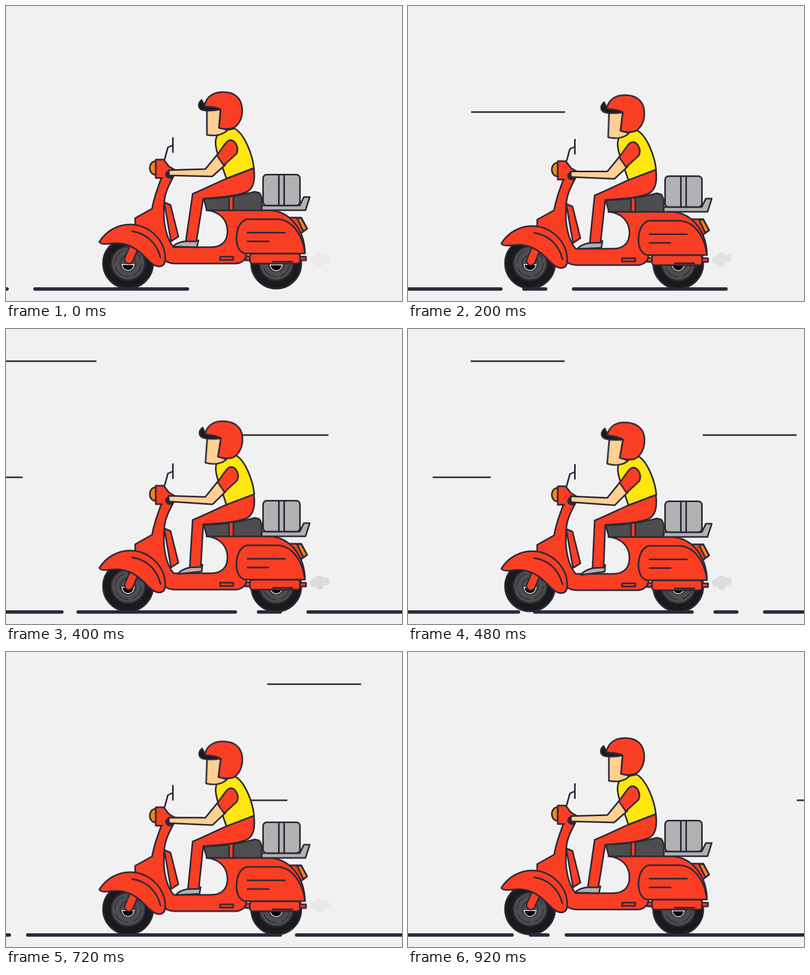
Recreate the animation shown at these times as an HTML page. Size 751x559 px, loop 0.96 s.

```html
<!DOCTYPE html>
<html lang="en">
<head>
<meta charset="utf-8">
<title>Scooter ride</title>
<style>
html, body { margin: 0; width: 100%; height: 100%; overflow: hidden; background: #f1f1f1; }
svg { display: block; width: 751px; height: 559px; }

.ink { stroke: #2d2838; stroke-width: 3; stroke-linejoin: round; stroke-linecap: round; }
.line { fill: none; }
.red { fill: #fa3e24; }
.yellow { fill: #ffe60d; }
.skin { fill: #ffd092; }
.grey { fill: #b1b1b1; }
.seat { fill: #4d4d4d; }
.orange { fill: #f7860e; }
.black { fill: #1a1a1a; }
.thin { stroke-width: 1.5; }
.fork { stroke-width: 19; }
.fork-fill { stroke: #fa3e24; stroke-width: 13.5; }

.wind, .road { animation: slide .96s steps(24) infinite; }
.wind { --run: 1506px; stroke-linecap: butt; }
.road { --run: 1243px; stroke-width: 6.5; }
@keyframes slide { to { transform: translateX(var(--run)); } }

/* down for 12 steps, up for 11, then rest */
.bob, .morph { animation: bob .96s infinite; }
.bob { transform-box: view-box; transform-origin: 412px 205px; }
.morph { animation-name: morph; }
@keyframes bob {
  0% { transform: none; animation-timing-function: steps(12); }
  50% { transform: var(--low); animation-timing-function: steps(11); }
  95.8333%, 100% { transform: none; }
}
@keyframes morph {
  0% { d: var(--up); animation-timing-function: steps(12); }
  50% { d: var(--down); animation-timing-function: steps(11); }
  95.8333%, 100% { d: var(--up); }
}

.body { --low: translate(0, 7px); }
.sleeve { --low: translate(1.5px, 8.5px); }
.head { --low: translate(0, 14px) rotate(5deg); }

.leg {
  --up: path("M470 307C473 330 470 347 455 353C435 361 400 363 374 365L361 446L341 446L354 356C380 345 400 335 418 327Z");
  --down: path("M470 314C473 337 470 354 455 360C435 368 400 370 374 371L371 452L350 453L354 363C380 352 400 342 418 334Z");
}
.shoe {
  --up: path("M317 456C322 449 335 446 346 445L365 444L362 457Z");
  --down: path("M328 466C333 458 345 454 356 452L374 447L373 460Z");
}
.torso {
  --up: path("M400 246C392 262 404 287 411 307L418 327L470 307C468 283 452 241 433 232L416 236Z");
  --down: path("M400 254C393 270 405 294 411 313L418 334L471 314C469 290 455 252 437 241L418 246Z");
}
.arm {
  --up: path("M309 311L378 309L402 280L416 301L391 323L309 321Z");
  --down: path("M308 317L378 320L403 289L417 309L392 334L309 328Z");
}

.smoke { fill: #dcdcdc; animation: puff .96s infinite; }
@keyframes puff {
  0% { opacity: .28; animation-timing-function: steps(5); }
  20.8333% { opacity: .75; animation-timing-function: steps(3); }
  33.3333% { opacity: 1; animation-timing-function: steps(4); }
  50% { opacity: .95; animation-timing-function: steps(11); }
  95.8333% { opacity: 0; animation-timing-function: steps(1); }
  100% { opacity: .28; }
}
</style>
</head>
<body>
<svg viewBox="0 0 751 559">
  <defs>
    <g id="wheel">
      <circle class="ink black" r="47.5"/>
      <circle class="ink seat" r="32"/>
      <circle class="ink line thin" r="25" stroke-dasharray="30 9"/>
      <circle class="ink seat thin" r="15"/>
      <path d="M-11 2.500A11 11 0 0 0 11 2.500Z" stroke="#fff" stroke-width="1.8" stroke-dasharray="2.4 .8"/>
    </g>
  </defs>

  <path class="ink line wind" d="M-194 201h178M-634 61h178M-706 281h110"/>
  <path class="ink line road" d="M-39 536.200H2M55 536.200H344M-381 536.200H-83M-891 536.200H-412M-959 536.200H-926M-1300 536.200H-994"/>

  <g class="smoke">
    <circle cx="584" cy="481" r="8"/>
    <circle cx="594" cy="476" r="8.5"/>
    <circle cx="606" cy="478" r="8"/>
    <circle cx="595" cy="486" r="8"/>
  </g>

  <use href="#wheel" x="231.5" y="487.5"/>
  <use href="#wheel" x="512.5" y="488"/>

  <g class="bob body ink">
    <!-- fork and fittings -->
    <path class="line fork" d="M245 452L233 480"/>
    <path class="line fork-fill" d="M245 452L233 480"/>
    <path class="red" d="M454 474h10v8h-10zM556 475h13v7h-13z"/>
    <path class="red" d="M537 401H560L571 422L559 431Z"/>
    <path class="orange" d="M552 402H560L571 422L564 427Z"/>

    <!-- frame -->
    <path class="red" d="M300 372L312 377L327 437L313 446Z"/>
    <path class="red" d="M245 416V402L277 384C281 362 287 347 296 322L323 312C315 330 300 350 300 376C297 410 304 441 318 457H388C410 457 420 445 420 427C420 405 405 389 380 387H500C540 389 566 425 567 468L456 469C456 480 447 488 435 488H320C309 488 302 484 296 478Z"/>
    <path class="red" d="M177 447C190 426 212 414 235 414C269 414 302 441 302 479C302 489 298 493.500 290 493.500C280 493 272 484 262 474C244 456 225 447 200 450C186 452 178 451 177 447Z"/>
    <path class="line" d="M239 427C262 430 285 445 293 477"/>
    <rect class="red" x="462.5" y="469" width="95" height="19" rx="5"/>
    <path class="red" d="M456 404H514C536 404 561 424 567 469H453C441 466 437 452 437 439C438 420 445 408 456 404Z"/>
    <path class="line" d="M458 429.500H529M458 446H498M506 484.500H543"/>
    <rect class="red" x="406" y="475" width="25" height="6"/>

    <!-- seat and cargo -->
    <path class="seat" d="M375 365C420 365 450 357 472 352L480 354C486 360 486 374 484 387H381Z"/>
    <path class="red" d="M423 361L431 360V387H423Z"/>
    <path class="grey" d="M485 378H557L565 362H576L568 387H485Z"/>
    <rect class="grey" x="487.5" y="319.5" width="70" height="58.5" rx="7"/>
    <path class="line" d="M517.500 320V378M527.500 320V378"/>

    <!-- handlebar -->
    <path class="line" d="M301 290L307 268L316 264M316.500 250V277"/>
    <path class="orange" d="M284 294C269 294 269 320 284 320Z"/>
    <path class="red" d="M284 291H299L309 304L323 312L314 326H284Z"/>
    <path class="red" d="M298 323L318 314L311 328L297 331Z" stroke="none"/>
    <circle cx="310" cy="319" r="6.5" fill="#2d2838"/>
  </g>

  <path class="ink grey morph shoe"/>
  <path class="ink red morph leg"/>
  <path class="ink yellow morph torso"/>
  <path class="ink skin morph arm"/>
  <path class="ink red bob sleeve" d="M400 283L413 302L437 280C443 268 434 253 424 254.500C419 255 416 261 412 266Z"/>

  <g class="bob head ink">
    <path class="skin" d="M381 194V244C395 247 411 245 420 235L404 230L407 194Z"/>
    <path class="red" d="M376 190C380 170 395 163 412 163C437 163 448 178 448 198C448 215 440 227 431 231C422 234 410 233 404 231L407 197C398 190 385 192 376 190Z"/>
    <path class="black" d="M371 178C364 184 364 192 370 196C380 200 395 198 407 196C400 191 385 193 376 190C376 185 373 183 371 178Z"/>
  </g>
</svg>
</body>
</html>
```
